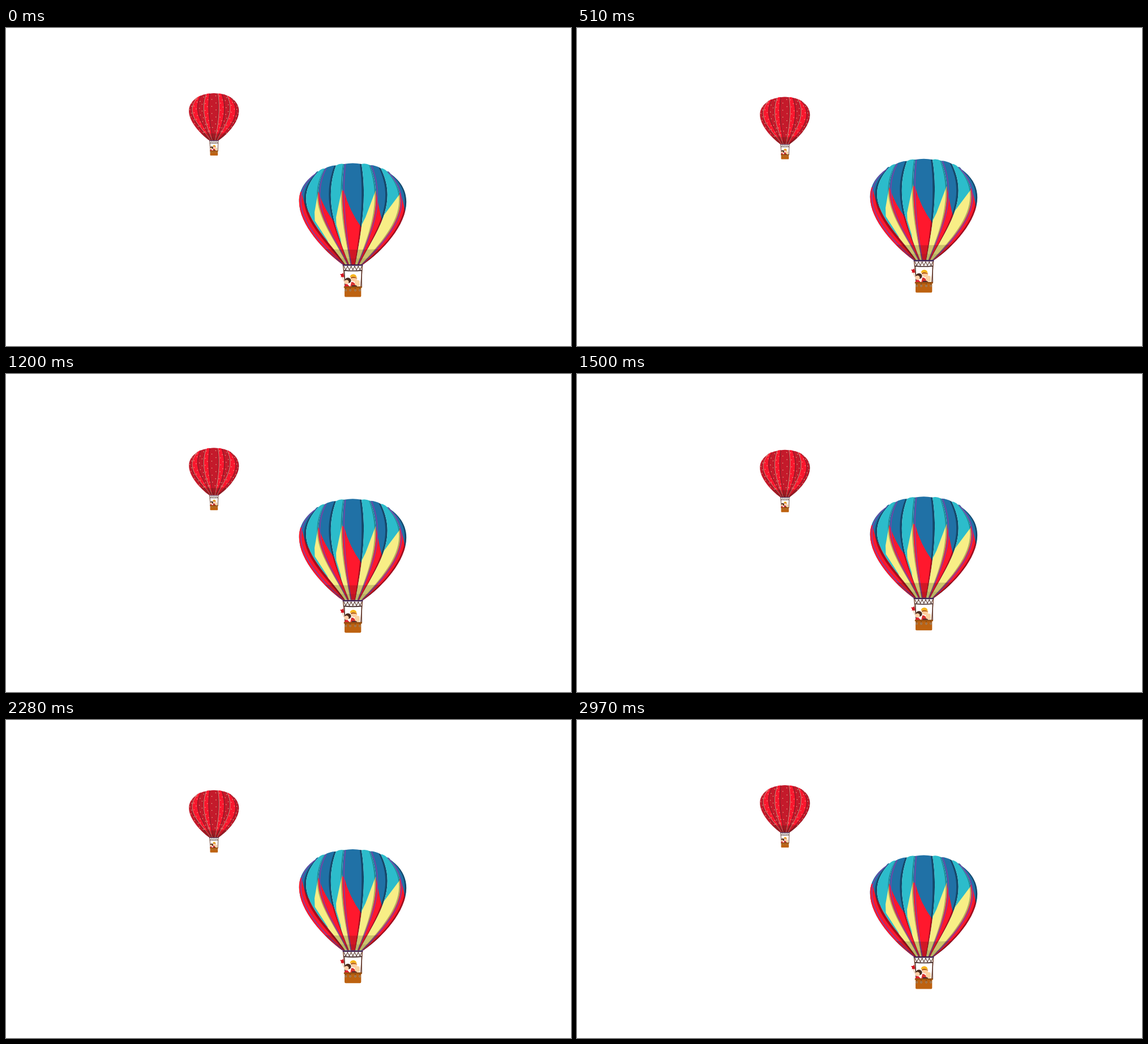
These frames come from a looping animation (998 px wide and 561 px high, 3 s). An HTML page:

```html
<!DOCTYPE html>
<html lang="en">
<head>
<meta charset="utf-8">
<title>Hot-air balloons</title>
<style>
  html, body { margin: 0; width: 100%; height: 100%; overflow: hidden; background: #fff; }
  svg { display: block; width: 998px; height: 561px; }
</style>
</head>
<body>
<svg id="stage" viewBox="0 0 998 561" xmlns="http://www.w3.org/2000/svg"></svg>
<script>
const LOOP = 3000, STEP = 30, TURN = (LOOP - STEP) / 2;
const BIG_RISE = 22.5, SMALL_DROP = 19;

// Seams of the envelope: top, two points on the way, neck.
const seams = [
  [546, 257, 518, 312, 546, 371, 594, 417],
  [552, 253, 531, 311, 559, 365, 599, 417],
  [563, 248, 552.5, 307, 573, 362, 603, 417],
  [583, 242.5, 574, 302, 585, 359, 606, 417],
  [597, 240, 594, 299, 599, 358, 609, 417],
  [628, 240, 632, 299, 627, 358, 617, 417],
  [643, 242, 653.5, 302, 643, 359, 621, 417],
  [662, 247.5, 673, 307, 654, 362, 624, 417],
  [673, 253, 696.5, 309, 674, 364, 628, 417],
  [679, 257, 707, 312, 680, 371, 631, 417]
].map(toBezier);

// Cubic that passes through the two inner points at 1/3 and 2/3.
function toBezier([x0, y0, ax, ay, bx, by, x3, y3]) {
  const c1 = (p, a, b, q) => (-5 * p + 18 * a - 9 * b + 2 * q) / 6;
  const c2 = (p, a, b, q) => (2 * p - 9 * a + 18 * b - 5 * q) / 6;
  return [[x0, y0],
    [c1(x0, ax, bx, x3), c1(y0, ay, by, y3)],
    [c2(x0, ax, bx, x3), c2(y0, ay, by, y3)],
    [x3, y3]];
}

const mix = (m, n, f) => m.map((p, i) => p.map((v, k) => v + (n[i][k] - v) * f));
const pt = p => p.map(v => v.toFixed(2)).join(' ');
const curve = ([a, b, c, d]) => `M${pt(a)}C${pt(b)} ${pt(c)} ${pt(d)}`;

function pointAt(m, t) {
  const u = 1 - t, w = [u * u * u, 3 * u * u * t, 3 * u * t * t, t * t * t];
  return [0, 1].map(k => m.reduce((s, p, i) => s + p[k] * w[i], 0));
}

function panel(m, n) {
  const top = [(m[0][0] + n[0][0]) / 2, (m[0][1] + n[0][1]) / 2 - 3];
  return curve(m) + `L${pt(n[3])}C${pt(n[2])} ${pt(n[1])} ${pt(n[0])}Q${pt(top)} ${pt(m[0])}Z`;
}

const path = (d, fill, extra = '') => `<path d="${d}" fill="${fill}" ${extra}/>`;
const line = (d, color, w) => path(d, 'none', `stroke="${color}" stroke-width="${w}"`);
const dot = (x, y, r, fill) => `<circle cx="${x}" cy="${y}" r="${r}" fill="${fill}"/>`;
const oval = (x, y, rx, ry, fill) => `<ellipse cx="${x}" cy="${y}" rx="${rx}" ry="${ry}" fill="${fill}"/>`;
const box = (x, y, w, h, fill, r = 0) =>
  `<rect x="${x}" y="${y}" width="${w}" height="${h}" rx="${r}" fill="${fill}"/>`;

const gores = seams.slice(1).map((right, i) => ({
  left: seams[i], right, d: panel(seams[i], right),
  width: right[1][0] - seams[i][1][0], dark: i % 2 === 0
}));

// Coloured flames in the lower half of each gore.
const flames = [
  'M522 289Q526 310 534 325H620V430H500V289Z',
  'M551.5 288L545 325L545.5 340L568 375L580 430H640L560 288Z',
  'M552 289Q562 320 582 345H620V430H540V289Z',
  'M593.5 284L583 334L583.5 347L591 372L600 430H625L598 284Z',
  'M597 287Q606 322 628 352V430H590V287Z',
  'M653.5 285L635 334L626 352L610 430H640L660 285Z',
  'M653 287Q658 312 662 331L666 345V430H600V287Z',
  'M697 291L667 331L661 347L640 378L615 430H660L705 291Z',
  'M697 291Q702 306 705 325V430H610V291Z'
];

const shade = (g, px, a) =>
  path(panel(mix(g.left, g.right, 1 - px / g.width), g.right), '#000', `fill-opacity="${a}"`);

function skirt() {
  return `<g clip-path="url(#hull)">` +
    path('M500 385Q612 397 725 385V430H500Z', '#1a1408', 'fill-opacity=".2"') +
    path('M500 403Q612 410 725 403V430H500Z', '#1a1408', 'fill-opacity=".09"') + '</g>';
}

function stripedEnvelope() {
  return gores.map((g, i) => {
    let inner = path(flames[i], g.dark ? '#ff182d' : '#f8ee86');
    inner += g.dark ? shade(g, 5, .36) : shade(g, 3.5, .28);
    if (g.dark) inner += line(curve(mix(g.left, g.right, 4 / g.width)), '#7e41a5', 1.6);
    return path(g.d, g.dark ? '#2071a6' : '#2cbccb') + `<g clip-path="url(#gore${i})">${inner}</g>`;
  }).join('') + skirt();
}

function dottedEnvelope() {
  return gores.map((g, i) => {
    let s = path(g.d, g.dark ? '#c41a2b' : '#fa172e') + shade(g, 4, .3);
    if (i) s += line(curve(g.left), g.dark ? '#7d1622' : '#cf9584', 1.9);
    for (let k = 0; k < 11; k++) {
      const f = (k + i) % 2 ? .27 : .7;
      const [x, y] = pointAt(mix(g.left, g.right, f), .05 + k * .075);
      s += dot(x.toFixed(1), y.toFixed(1), 1.6, '#e5b795');
    }
    return s;
  }).join('') + skirt();
}

function basket() {
  let zig = 'M597 420';
  for (let k = 1; k < 11; k++) zig += `L${597 + k * 3.15} ${k % 2 ? 427 : 420}`;
  let s = line('M595.5 419L600 458M629.5 419L626.5 458', '#7a452f', 1.5) +
    line('M598 428L598.5 457M628 428L628.5 457', '#4a2a24', .9) +
    line(zig, '#59392f', 1.1) +
    line('M596.5 427.6Q612.5 429.5 629 427.6', '#3f2523', 1.6) +
    box(594.5, 416.6, 36, 2.9, '#40204f', 1);
  // passengers
  s += oval(604, 445.5, 5.6, 5, '#4c2a1c') + oval(601.5, 448.3, 3.9, 3.8, '#ffd0a8') +
    path('M597.5 457Q598 451 603 452L608 457Z', '#e02330') +
    oval(615, 442.5, 5.2, 5, '#ffce9f') +
    path('M607.5 440Q608 434.5 613.5 434.3Q618.5 434.5 619.5 440Q613 437 607.5 440Z', '#f6b51c') +
    path('M609 440Q613 437.5 618 440L620.5 442Q613 440 609 442Z', '#b25b14') +
    path('M608 457L610 448Q616 447 619 457Z', '#d8322f') +
    path('M611 454H620V456H611Z', '#3b2730') +
    path('M616 447Q620 443 624.5 446L625 454Q619 457 616 452Z', '#fbd3a2');
  // basket
  s += box(598, 457, 29.3, 17.6, '#bd6210', 2.2) + box(596.7, 455.8, 32.2, 2.8, '#98500f', 1.2);
  for (const x of [600, 608, 617, 625])
    s += line(`M${x} 458.5V461`, '#6c3b12', 1) +
      `<circle cx="${x}" cy="462.6" r="1.5" fill="none" stroke="#8f8c86" stroke-width="1"/>`;
  return s;
}

const flag = line('M592.5 436L597 447', '#e9bd8e', 1) +
  path('M590 434L593 434L595.5 432L597 436.5L596.5 440L593 439L591.5 440L592 437Z', '#d3131f');

const clip = (id, d) => `<clipPath id="${id}"><path d="${d}"/></clipPath>`;
const stage = document.getElementById('stage');
stage.innerHTML =
  '<defs>' + gores.map((g, i) => clip('gore' + i, g.d)).join('') +
  clip('hull', panel(seams[0], seams[9])) + '</defs>' +
  `<g id="small"><g transform="translate(82.1 3.95) scale(.4656)">${basket()}${dottedEnvelope()}</g></g>` +
  `<g id="big">${flag}${basket()}${stripedEnvelope()}</g>`;

const small = document.getElementById('small');
const big = document.getElementById('big');
const start = performance.now();

function draw() {
  const t = Math.floor((performance.now() - start) % LOOP / STEP) * STEP;
  const f = 1 - Math.abs(1 - t / TURN);
  small.setAttribute('transform', `translate(0 ${SMALL_DROP * f})`);
  big.setAttribute('transform', `translate(0 ${-BIG_RISE * f})`);
  requestAnimationFrame(draw);
}
draw();
</script>
</body>
</html>
```
